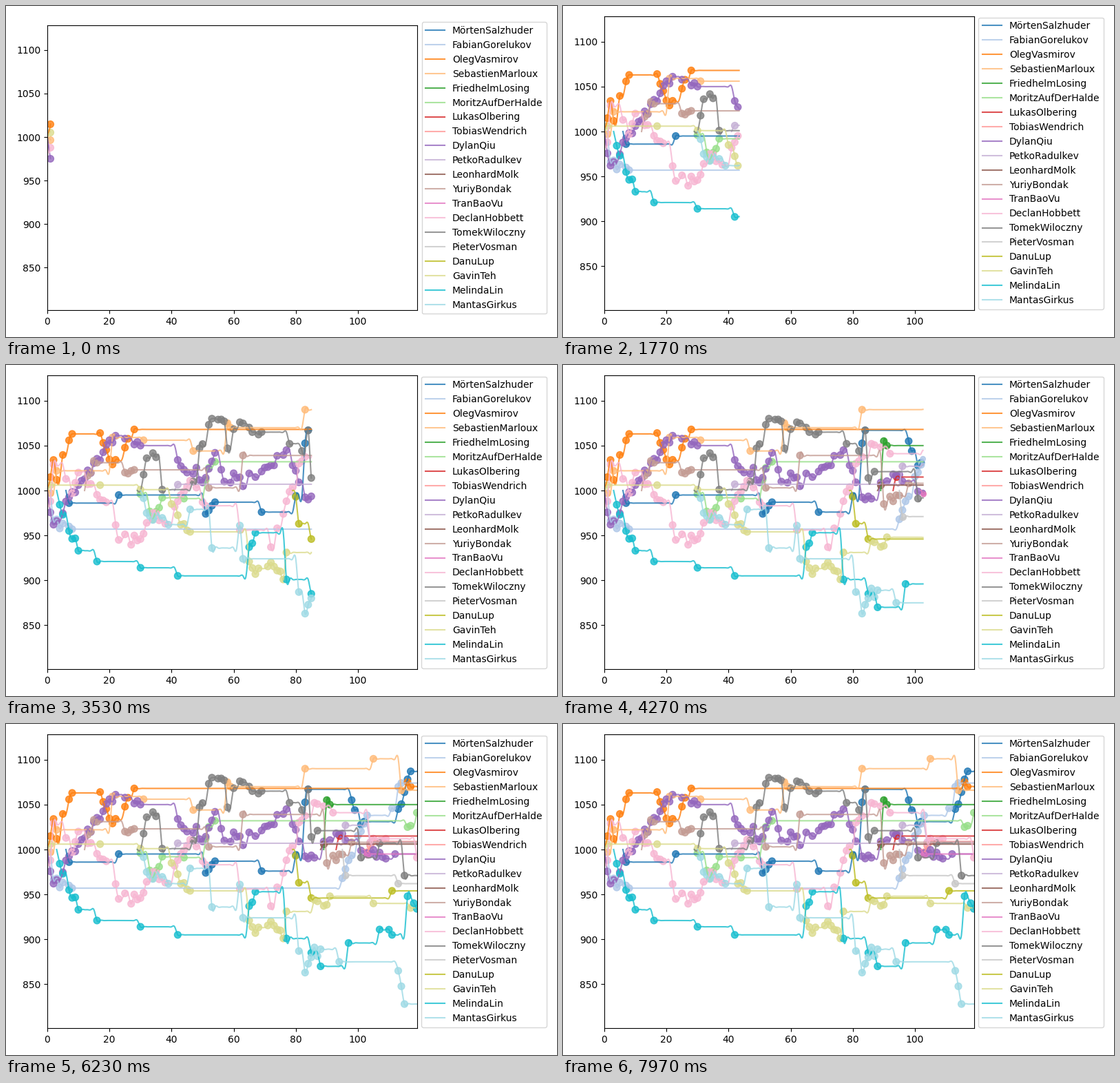
A matplotlib script that plays this animation: 800 by 480 pixels, repeating every 8.01 s.

```python
import matplotlib.pyplot as plt
import numpy as np
from matplotlib.animation import FuncAnimation

FRAMES, LOOP = 240, 8010
LAST, SPEED = 119, 0.8  # last game, games per frame
ALPHA, WOBBLE, PACE = 0.8, 4, 0.65
BIG, SMALL = 50, 28

fig, ax = plt.subplots(figsize=(8, 4.8), dpi=100)
ax.set_xlim(0, LAST)
ax.set_ylim(801, 1128.2)
palette = plt.get_cmap("tab20").colors
players = []


def spline(y, t):
    """Natural cubic spline through y at unit spacing, evaluated at t."""
    n = len(y)
    a = np.eye(n)
    rhs = np.zeros(n)
    for i in range(1, n - 1):
        a[i, i - 1:i + 2] = 1, 4, 1
        rhs[i] = 6 * (y[i - 1] - 2 * y[i] + y[i + 1])
    m = np.linalg.solve(a, rhs)
    i = np.clip(t.astype(int), 0, n - 2)
    u = t - i
    v = 1 - u
    return (v * y[i] + u * y[i + 1]
            + ((v**3 - v) * m[i] + (u**3 - u) * m[i + 1]) / 6)


def play(start, base, keys, busy, rng):
    """Games by number: random ones fill the gap between keys that lie close."""
    games = {}
    k0, r0 = start, base
    for k1, r1 in keys.items():
        if k1 - k0 <= busy:
            for k in range(k0 + 1, k1):
                if rng.random() < PACE:
                    drift = (r1 - r0) * (k - k0) / (k1 - k0)
                    games[k] = r0 + drift + rng.normal(0, WOBBLE)
        games[k1] = r1
        k0, r0 = k1, r1
    return games


def add(name, start, keys, busy=4, base=1000):
    """Add a player whose rating is flat between games."""
    seed = len(players)
    games = play(start, base, keys, busy, np.random.default_rng(seed))
    ratings = [base]
    for k in range(start + 1, LAST + 1):
        ratings.append(games.get(k, ratings[-1]))
    x = np.linspace(start, LAST, (LAST - start) * 10 + 1)
    y = spline(np.array(ratings, float), x - start)
    color = palette[seed]
    line, = ax.plot([], [], color=color, alpha=ALPHA, label=name)
    dots = ax.scatter([], [], color=[color], alpha=ALPHA)
    players.append((x, y, np.array(list(games.items()), float), line, dots))


add("MörtenSalzhuder", 6, {7: 986, 23: 995, 51: 974, 54: 987, 69: 976, 80: 994,
                           84: 1067, 98: 1055, 102: 1031, 113: 1045, 117: 1087})
add("FabianGorelukov", 1, {2: 966, 8: 957, 95: 968, 97: 988, 103: 1038,
                           111: 1046, 114: 1074}, busy=6)
add("OlegVasmirov", 0, {2: 1034, 3: 1012, 8: 1063, 17: 1064, 21: 1029,
                        28: 1068, 116: 1075, 117: 1070}, busy=7)
add("SebastienMarloux", 0, {3: 1022, 21: 1059, 31: 1056, 47: 1044, 58: 1075,
                            59: 1070, 83: 1090, 105: 1101, 114: 1066})
add("FriedhelmLosing", 89, {90: 1055, 91: 1050})
add("MoritzAufDerHalde", 29, {30: 996, 34: 968, 37: 992, 44: 991, 51: 1012,
                              54: 1032, 116: 1025, 119: 1041})
add("LukasOlbering", 93, {94: 1015})
add("TobiasWendrich", 102, {103: 997, 105: 1009})
add("DylanQiu", 0, {2: 962, 10: 1006, 20: 1056, 30: 1050, 42: 1034, 50: 1009,
                    54: 1042, 57: 1010, 67: 1015, 77: 1045, 84: 990, 93: 1018,
                    103: 996, 112: 995}, busy=10)
add("PetkoRadulkev", 41, {42: 1007, 96: 1027, 104: 1008})
add("LeonhardMolk", 88, {89: 1006})
add("YuriyBondak", 12, {15: 1033, 16: 1031, 25: 1020, 28: 1023, 52: 1003,
                        63: 1039, 90: 985, 93: 988, 98: 1008}, busy=5)
add("TranBaoVu", 102, {103: 995})
add("DeclanHobbett", 0, {1: 988, 2: 1029, 8: 997, 10: 1020, 18: 989, 23: 945,
                         30: 946, 34: 975, 38: 963, 46: 1011, 51: 983, 62: 956,
                         72: 937, 76: 974, 81: 1030, 86: 1052, 92: 1041,
                         104: 1008, 109: 1012, 119: 991}, busy=8, base=986)
add("TomekWiloczny", 29, {32: 1036, 35: 1037, 37: 1001, 47: 1010, 49: 1047,
                          53: 1080, 57: 1077, 58: 1047, 62: 1076, 66: 1065,
                          69: 1065, 78: 1052, 82: 1044, 84: 1067, 85: 1014,
                          87: 1021, 101: 991, 107: 1007, 115: 971})
add("PieterVosman", 95, {96: 971, 113: 962})
add("DanuLup", 79, {80: 993, 81: 963, 85: 946, 111: 954}, busy=1)
add("GavinTeh", 0, {1: 1006, 17: 1006, 30: 1001, 40: 985, 46: 954, 65: 921,
                    67: 907, 72: 920, 76: 901, 77: 931, 86: 944, 91: 948,
                    105: 940, 117: 935}, busy=6)
add("MelindaLin", 3, {7: 955, 10: 933, 16: 921, 30: 914, 42: 905, 65: 937,
                      67: 953, 77: 901, 85: 885, 88: 870, 97: 896, 107: 911,
                      111: 905, 116: 948, 119: 934})
add("MantasGirkus", 30, {32: 975, 35: 972, 39: 962, 46: 979, 53: 936, 62: 961,
                         63: 924, 81: 887, 83: 863, 85: 880, 88: 889, 94: 875,
                         113: 865, 115: 828})

ax.legend(loc="center left", bbox_to_anchor=(1, 0.5))

# The layout settles over the first few frames, one pass at a time.
fig.tight_layout()
layouts = []
for _ in range(4):
    fig.tight_layout()
    layouts.append(ax.get_position().frozen())


def update(frame):
    ax.set_position(layouts[min(frame, len(layouts) - 1)])
    tip = min(1 + SPEED * frame, LAST)
    for x, y, games, line, dots in players:
        seen = x <= tip
        tip_y = np.interp(tip, x, y)
        if seen.any():
            line.set_data(np.append(x[seen], tip), np.append(y[seen], tip_y))
        else:
            line.set_data([], [])
        done = games[games[:, 0] <= tip]
        sizes = [BIG] * len(done)
        # a game about to finish rides on the tip of its line
        upcoming = round(tip)
        if upcoming > tip and upcoming in games[:, 0]:
            done = np.vstack([done, (tip, tip_y)])
            sizes.append(SMALL)
        dots.set_offsets(done)
        dots.set_sizes(sizes)
    return []


anim = FuncAnimation(fig, update, frames=FRAMES, interval=LOOP / FRAMES, repeat=True)
plt.show()
```
